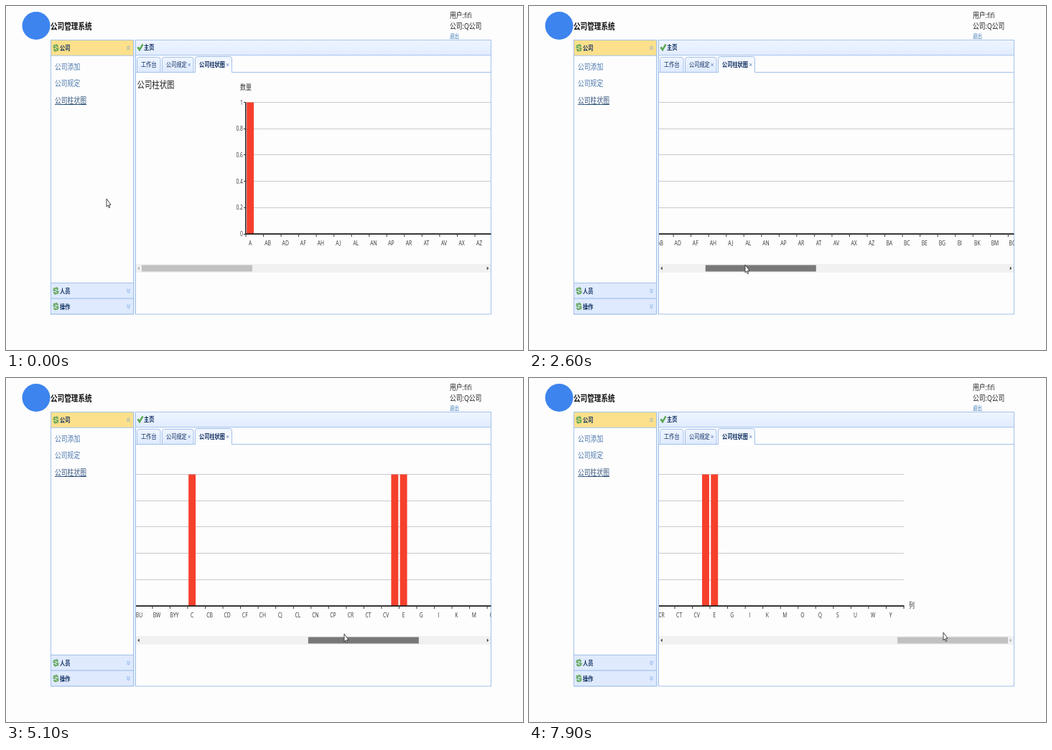
Write an HTML page with a canvas that moves like this. It is 720 px wide and 480 px high and loops after 8000 ms.

```html
<!DOCTYPE html>
<html lang="zh-CN">
<head>
<meta charset="utf-8">
<style>
html, body { margin: 0; width: 100%; height: 100%; overflow: hidden; background: #fdfdfe; }
canvas { display: block; }
</style>
</head>
<body>
<canvas id="stage" width="720" height="480"></canvas>
<script>
const ctx = document.getElementById('stage').getContext('2d');
const LOOP = 8000, STEP = 100;
const FONT = '"Open Sans", "Noto Sans CJK SC", "Noto Sans CJK", sans-serif';
const ASPECT = 0.8; // the recorded screen is narrower than square pixels
const BORDER = '#a3c1ea', NAVY = '#0e2d5f', LINK = '#4a78ab';

// time, pointer x, pointer y, chart scroll
const KEYS = [
  [0, 140, 269, 0], [1000, 237, 361, 0], [1900, 244, 362, 0],
  [2600, 301, 361, 182], [3100, 339, 360, 300], [3200, 339, 360, 300],
  [4300, 429, 359, 579.6], [5100, 471, 357, 743.6], [6400, 545, 355, 968],
  [6500, 549, 355, 982], [6600, 549, 355, 982], [7100, 570, 355, 1039],
  [7900, 577, 355, 1039]
];
const MAX_SCROLL = 1039;

const ORIGIN = 334, SLOT = 24.54, BASE = 318, TOP = 134.5;
const everyOther = (from, to, prefix = '') => {
  const out = [];
  for (let c = from.charCodeAt(0); c <= to.charCodeAt(0); c += 2) out.push(prefix + String.fromCharCode(c));
  return out;
};
const LABELS = ['A', ...everyOther('B', 'Z', 'A'), ...everyOther('A', 'W', 'B'), 'BYY',
  'C', ...everyOther('B', 'V', 'C'), ...everyOther('E', 'Y')];
const BARS = [0, 27, 38.5, 39];
const AXIS_END = ORIGIN + LABELS.length * SLOT;

function pose(t) {
  let i = 1;
  while (i < KEYS.length - 1 && KEYS[i][0] < t) i++;
  const a = KEYS[i - 1], b = KEYS[i];
  const k = Math.min(1, (t - a[0]) / (b[0] - a[0]));
  return a.map((v, n) => v + (b[n] - v) * k).slice(1);
}

function rect(x, y, w, h, color) {
  ctx.fillStyle = color;
  ctx.fillRect(x, y, w, h);
}

function box(x, y, w, h, fill) {
  if (fill) rect(x, y, w, h, fill);
  ctx.strokeStyle = BORDER;
  ctx.lineWidth = 1;
  ctx.strokeRect(x, y, w, h);
}

function path(points, stroke, width = 1, fill) {
  ctx.beginPath();
  points.forEach(([x, y]) => ctx.lineTo(x, y));
  if (fill) {
    ctx.closePath();
    ctx.fillStyle = fill;
    ctx.fill();
  }
  if (stroke) {
    ctx.strokeStyle = stroke;
    ctx.lineWidth = width;
    ctx.stroke();
  }
}

function text(str, x, middle, size, color, { bold = false, align = 'left' } = {}) {
  ctx.save();
  ctx.translate(x, middle + size * 0.37);
  ctx.scale(ASPECT, 1);
  ctx.font = `${bold ? 'bold ' : ''}${size}px ${FONT}`;
  ctx.textAlign = align;
  ctx.fillStyle = color;
  ctx.fillText(str, 0, 0);
  ctx.restore();
}

function gradient(y0, y1, from, to) {
  const g = ctx.createLinearGradient(0, y0, 0, y1);
  g.addColorStop(0, from);
  g.addColorStop(1, to);
  return g;
}

function refreshIcon(x, y) {
  for (const s of [-1, 1]) {
    const p = [[-3, 0.5], [-2.5, -3], [1, -4], [2.8, -1.8]].map(([a, b]) => [x - s * a, y - s * b]);
    path(p, '#3f8a3c', 2.2);
    path(p, '#a5d694', 0.9);
  }
  path([[x - 2, y - 1.5], [x + 2, y + 1.5]], '#5da653', 1.2);
}

function chevrons(x, y, dir) {
  for (const d of [-1.5, 1.5])
    path([[x - 2.2, y + d - dir], [x, y + d + dir], [x + 2.2, y + d - dir]], '#6d9fe0', 1);
}

function sideHeader(label, y, fill, dir) {
  box(62.5, y, 115, 21.7, fill);
  refreshIcon(69.5, y + 11);
  text(label, 75, y + 11, 9, NAVY, { bold: true });
  chevrons(170.5, y + 11, dir);
}

function tab(x, w, label, active, closable) {
  const y = active ? 70.5 : 71.5;
  ctx.beginPath();
  ctx.roundRect(x, y, w, 92.5 - y, [3, 3, 0, 0]);
  ctx.fillStyle = active ? gradient(70, 92, '#eff5ff', '#fff') : gradient(71, 92, '#eff5ff', '#dfebff');
  ctx.fill();
  ctx.strokeStyle = BORDER;
  ctx.lineWidth = 1;
  ctx.stroke();
  if (active) rect(x + 0.5, 91.5, w - 1, 2, '#fff');
  text(label, x + 5.5, 82, 9, NAVY, { bold: active });
  if (closable) {
    const cx = x + w - 5.8;
    for (const s of [-1, 1]) path([[cx - 1.5, 82 - 1.8 * s], [cx + 1.5, 82 + 1.8 * s]], '#6b8fc4', 1);
  }
}

function frame() {
  rect(0, 0, 720, 480, '#fdfdfe');
  ctx.beginPath();
  ctx.arc(42, 27.5, 19.5, 0, 7);
  ctx.fillStyle = '#3d84ee';
  ctx.fill();
  text('公司管理系统', 62, 29, 12, '#111', { bold: true });
  text('用户:fifi', 618, 12.5, 11, '#222');
  text('公司:Q公司', 618, 28, 11, '#222');
  text('退出', 618, 41.5, 8.2, '#3b78b5');

  box(62.5, 47.5, 115, 382.5);
  sideHeader('公司', 47.5, '#fde08b', -1);
  ['公司添加', '公司规定', '公司柱状图'].forEach((s, i) => text(s, 68, 84.7 + i * 23.6, 11, i < 2 ? LINK : '#35577f'));
  rect(68, 137, 44, 1, '#35577f');
  sideHeader('人员', 386.5, '#dfeafe', 1);
  sideHeader('操作', 408.2, '#dfeafe', 1);

  rect(178, 47, 2, 383, '#e6effc');
  box(180.5, 47.5, 495, 382.5);
  box(180.5, 47.5, 495, 21.2, gradient(47, 69, '#eff5ff', '#e0ecff'));
  const tick = [[183.5, 57.5], [186, 61], [190.5, 53.5]];
  path(tick, '#3c8f37', 2.4);
  path(tick, '#74c365', 1);
  text('主页', 192, 58, 9, NAVY, { bold: true });
  rect(181, 92, 494, 1, BORDER);
  tab(182.5, 32.5, '工作台');
  tab(217.5, 43.5, '公司规定', false, true);
  tab(263.5, 51, '公司柱状图', true, true);
}

function chart(scroll) {
  ctx.save();
  ctx.beginPath();
  ctx.rect(181, 94, 494.5, 264);
  ctx.clip();
  ctx.translate(-scroll, 0);
  text('公司柱状图', 182.5, 109, 13, '#222');
  text('数量', 334, 113, 10, '#333', { align: 'center' });
  for (let i = 0; i < 6; i++) {
    const y = TOP + (BASE - TOP) * i / 5;
    if (i < 5) rect(ORIGIN, Math.round(y - 0.5), AXIS_END - ORIGIN, 1, '#cacacf');
    rect(ORIGIN - 3, Math.round(y - 0.5), 3, 1, '#333');
    text(String((5 - i) / 5), 330, y, 8.5, '#333', { align: 'right' });
  }
  for (const i of BARS) rect(ORIGIN + (i + 0.25) * SLOT - 4.9, TOP, 9.9, BASE - TOP, '#f5402c');
  rect(ORIGIN - 1, TOP, 1.5, BASE - TOP, '#222');
  rect(ORIGIN - 1, BASE - 0.8, AXIS_END - ORIGIN + 1.5, 1.8, '#222');
  for (let i = 0; i <= LABELS.length; i++) {
    const x = ORIGIN + i * SLOT;
    rect(x - 0.5, BASE, 1, 4, '#333');
    if (i < LABELS.length) text(LABELS[i], x + SLOT / 4, 331, 8.5, '#333', { align: 'center' });
  }
  text('列', AXIS_END + 7, 317, 10, '#333');
  ctx.restore();
}

function scrollbar(scroll, thumbColor) {
  rect(181, 360, 494, 12, '#f1f1f2');
  rect(189 + scroll * 324 / MAX_SCROLL, 361.5, 154, 9, thumbColor);
  const arrow = (x, dir, live) =>
    path([[x + dir, 366], [x - dir, 363.5], [x - dir, 368.5]], null, 0, live ? '#404040' : '#a8a8a8');
  arrow(184.5, -1.2, scroll > 0);
  arrow(671, 1.2, scroll < MAX_SCROLL);
}

function pointer(x, y) {
  path([[0, 0], [0, 11], [1.9, 9], [3.3, 12.7], [4.8, 12], [3.4, 8.5], [6, 8.3], [0, 0]]
    .map(([a, b]) => [x + a, y + b]), '#333', 0.9, '#fff');
}

function draw(now) {
  const t = Math.floor(now % LOOP / STEP) * STEP;
  const [x, y, scroll] = pose(t);
  frame();
  chart(scroll);
  scrollbar(scroll, t < 1000 || t >= 7700 ? '#c1c1c1' : t < 1900 ? '#a8a8a8' : '#787878');
  pointer(x, y);
  requestAnimationFrame(draw);
}
requestAnimationFrame(draw);
</script>
</body>
</html>
```
